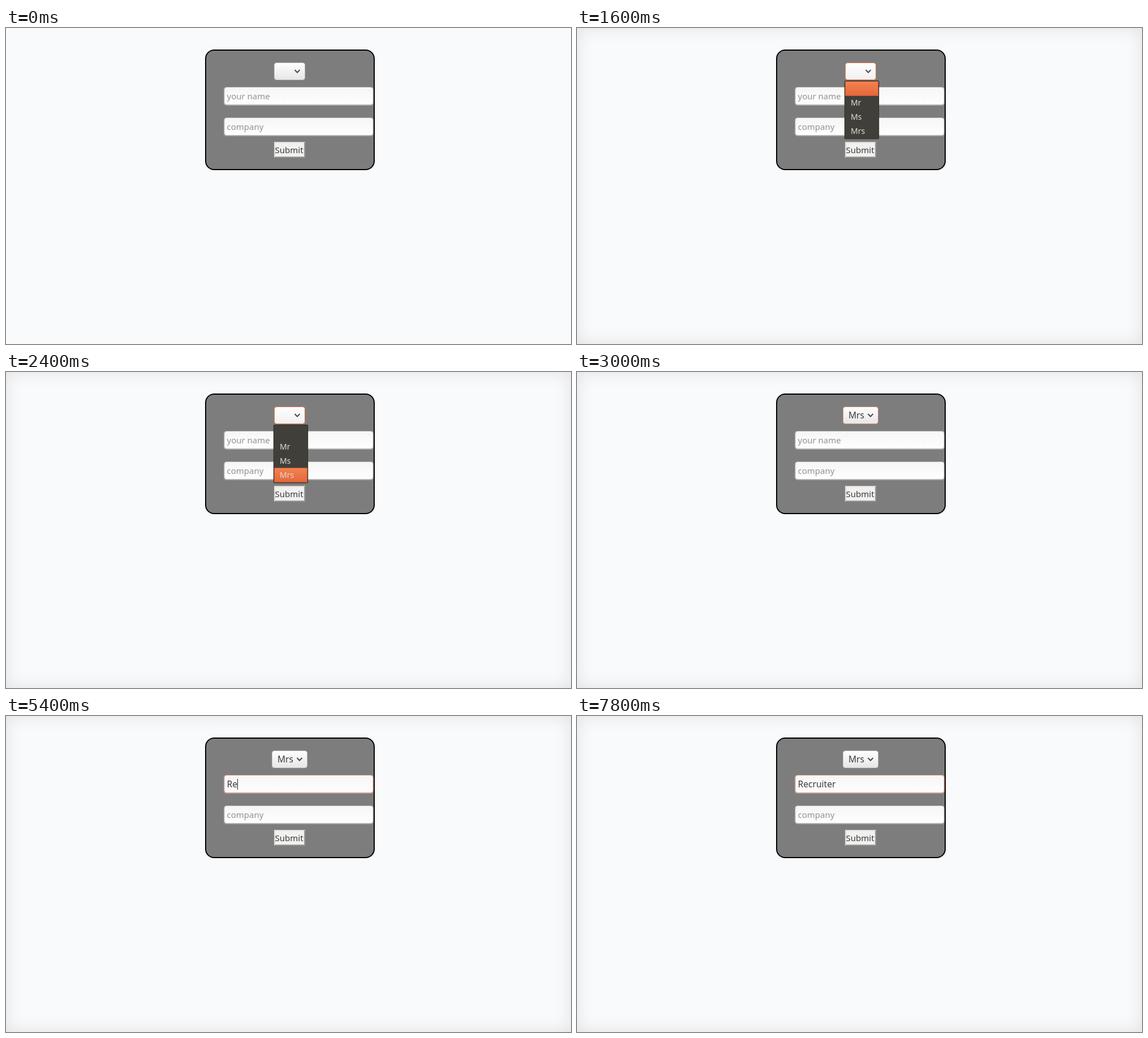
An HTML page that plays this animation: 999x558 px, repeating every 8 s.

```html
<!DOCTYPE html>
<html lang="en">
<head>
<meta charset="utf-8">
<title>Contact form</title>
<style>
  html, body { margin: 0; width: 100%; height: 100%; overflow: hidden; background: #f8fafc; }
  svg { display: block; position: absolute; left: 0; top: 0; }
  text { font: 15px "Noto Sans", "Open Sans", sans-serif; fill: #3c3c3c; white-space: pre; }
  .hint { fill: #92948f; }
  .menu text { font-size: 14px; fill: #dfdbd2; }
  #typed { font-size: 15.6px; }
  #choice { font-size: 15.5px; }
  #vignette { position: absolute; left: 0; top: 0; width: 999px; height: 558px; box-shadow: inset 0 0 30px rgba(0, 0, 0, .1); }
</style>
</head>
<body>
<svg width="999" height="558" viewBox="0 0 999 558">
  <defs>
    <linearGradient id="button" x2="0" y2="1"><stop stop-color="#fff"/><stop offset="1" stop-color="#e6e6e7"/></linearGradient>
    <linearGradient id="hover" x2="0" y2="1"><stop stop-color="#fff"/><stop offset="1" stop-color="#f0f0f0"/></linearGradient>
    <linearGradient id="field" x2="0" y2="1"><stop stop-color="#f6f6f6"/><stop offset="1" stop-color="#fefefe"/></linearGradient>
    <linearGradient id="orange" x2="0" y2="1"><stop stop-color="#f4824f"/><stop offset="1" stop-color="#e4683c"/></linearGradient>
    <g id="input">
      <rect width="265" height="33" rx="5" fill="#b3b0b1"/>
      <rect x="1.5" y="1" width="262" height="30" rx="4" fill="url(#field)"/>
    </g>
  </defs>

  <rect x="353" y="39" width="298" height="211" rx="15" fill="#7d7d7d" stroke="#000" stroke-width="2"/>

  <rect id="select" y="61.5" height="30" rx="4" stroke="#c3c0be"/>
  <rect id="selectRing" y="61.5" height="30" rx="4" fill="none" stroke="#dc7444"/>
  <text id="choice" x="480" y="82">Mrs</text>
  <path id="chevron" d="M-4.5 -2L0 2.5L4.5 -2" fill="none" stroke="#484848" stroke-width="2"/>

  <use href="#input" x="385" y="104"/>
  <rect id="inputRing" x="385.5" y="104.5" width="264" height="31.5" rx="4.5" fill="none" stroke="#e59470" stroke-width="1.2"/>
  <text id="nameHint" class="hint" x="390.5" y="126">your name</text>
  <text id="typed" x="390.5" y="126"></text>
  <rect id="caret" y="111" width="1" height="19" fill="#222"/>

  <use href="#input" x="385" y="158"/>
  <text class="hint" x="390.5" y="180">company</text>

  <path d="M474 201H529V229H474Z" fill="#f2f1f0"/>
  <path d="M475 229V202H529" fill="none" stroke="#dedad6" stroke-width="2"/>
  <path d="M475 228H528V202" fill="none" stroke="#9b9c9c" stroke-width="2"/>
  <text x="475.5" y="221">Submit</text>

  <g id="menu" class="menu">
    <rect x="472.5" y="92.5" width="62" height="104" rx="2" fill="#000" opacity=".25"/>
    <rect x="473.5" y="93.5" width="60" height="102" rx="1" fill="#403f39" stroke="#31302b"/>
    <rect id="highlight" x="474.5" width="58" height="25" fill="url(#orange)" stroke="#cb5a30"/>
    <text x="484" y="137">Mr</text>
    <text x="484" y="162">Ms</text>
    <text x="484" y="187">Mrs</text>
  </g>
</svg>
<div id="vignette"></div>
<script>
const LOOP = 8000;
const WORD = "Recruiter";
const KEY_TIMES = [5100, 5400, 5700, 6600, 6800, 7000, 7200, 7400, 7600];
const MENU_TIMES = [1600, 2000, 2300, 2400];

const el = id => document.getElementById(id);
const set = (id, attrs) => {
  for (const key in attrs) el(id).setAttribute(key, attrs[key]);
};
const show = (id, visible) => { el(id).style.display = visible ? "" : "none"; };
const passed = (times, t) => times.filter(time => time <= t).length;

// Value of the latest [time, value] step reached.
const step = (t, steps) => steps.reduce((value, [time, next]) => t >= time ? next : value, 0);

function draw(t) {
  const chosen = t >= 3000;
  const box = { x: chosen ? 470.5 : 474.5, width: chosen ? 62 : 54 };
  const hovered = t >= 900 && !chosen;
  set("select", { ...box, fill: `url(#${hovered ? "hover" : "button"})` });
  set("selectRing", { ...box, opacity: step(t, [[1300, 1], [3000, .7], [4200, .3], [4300, 0]]) });
  set("chevron", { transform: `translate(${chosen ? 519 : 515} 76)` });
  show("choice", chosen);

  show("menu", t >= MENU_TIMES[0] && !chosen);
  set("highlight", { y: 94.5 + 25 * Math.max(0, passed(MENU_TIMES, t) - 1) });

  const count = passed(KEY_TIMES, t);
  el("typed").textContent = WORD.slice(0, count);
  show("nameHint", count === 0);
  set("inputRing", { opacity: step(t, [[4200, .5], [4300, 1]]) });
  const textWidth = count ? el("typed").getComputedTextLength() : 0;
  set("caret", { x: Math.round(390.5 + textWidth) });
  show("caret", t >= 4200 && t < 7800);

  show("vignette", t >= 900);
}

const start = performance.now();
function tick() {
  draw((performance.now() - start) % LOOP);
  requestAnimationFrame(tick);
}
tick();
</script>
</body>
</html>
```
